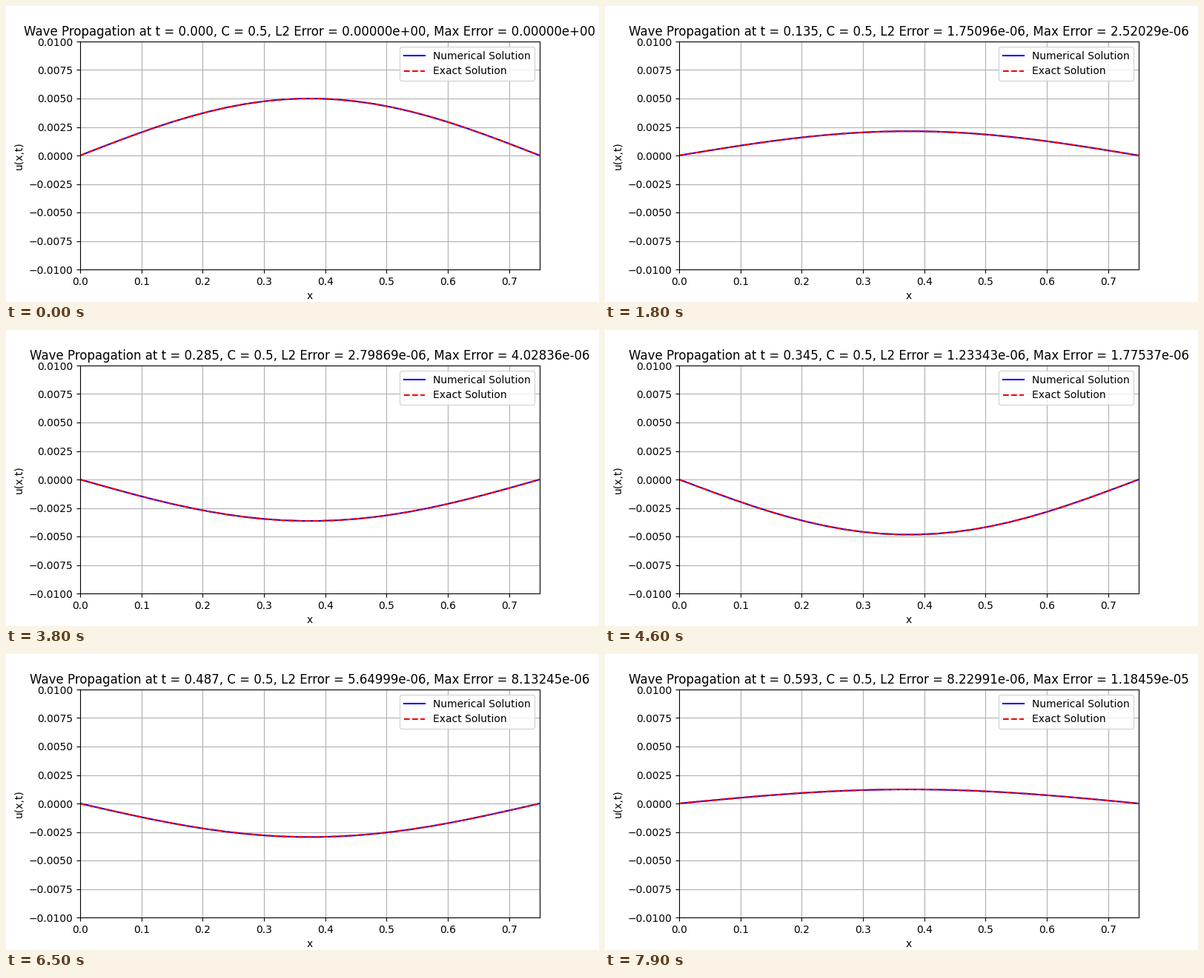
These frames come from a looping animation (800x400 px, 8000 ms). A matplotlib script:

```python
import numpy as np
import matplotlib.pyplot as plt
from matplotlib.animation import FuncAnimation

L, WAVE_SPEED, AMP = 0.75, 2.0, 0.005
NX, DT, FRAMES = 25, 0.0075, 80
COURANT = 0.5

x = np.linspace(0, L, NX + 1)


def exact(t):
    return AMP * np.sin(np.pi * x / L) * np.cos(np.pi * WAVE_SPEED * t / L)


def solve():
    """Leapfrog solution of the wave equation with fixed ends, one row per step."""
    u = np.zeros((FRAMES, NX + 1))
    u[0] = exact(0)
    for n in range(FRAMES - 1):
        bend = COURANT**2 * (u[n, 2:] - 2 * u[n, 1:-1] + u[n, :-2])
        if n == 0:
            u[1, 1:-1] = u[0, 1:-1] + 0.5 * bend
        else:
            u[n + 1, 1:-1] = 2 * u[n, 1:-1] - u[n - 1, 1:-1] + bend
    return u


numeric = solve()

fig, ax = plt.subplots(figsize=(8, 4), dpi=100)
line_num, = ax.plot(x, numeric[0], "b-", label="Numerical Solution")
line_exact, = ax.plot(x, exact(0), "r--", label="Exact Solution")
ax.set_xlim(0, L)
ax.set_ylim(-0.01, 0.01)
ax.set_xlabel("x")
ax.set_ylabel("u(x,t)")
ax.grid(True)
ax.legend(loc="upper right")


def update(n):
    t = n * DT
    true = exact(t)
    err = numeric[n] - true
    l2 = np.sqrt(np.mean(err**2))
    peak = np.max(np.abs(err))
    line_num.set_ydata(numeric[n])
    line_exact.set_ydata(true)
    ax.set_title(f"Wave Propagation at t = {t:.3f}, C = {COURANT}, "
                 f"L2 Error = {l2:.5e}, Max Error = {peak:.5e}")
    return line_num, line_exact


anim = FuncAnimation(fig, update, frames=FRAMES, interval=100,
                     repeat=True, repeat_delay=0, blit=False)
plt.show()
```
